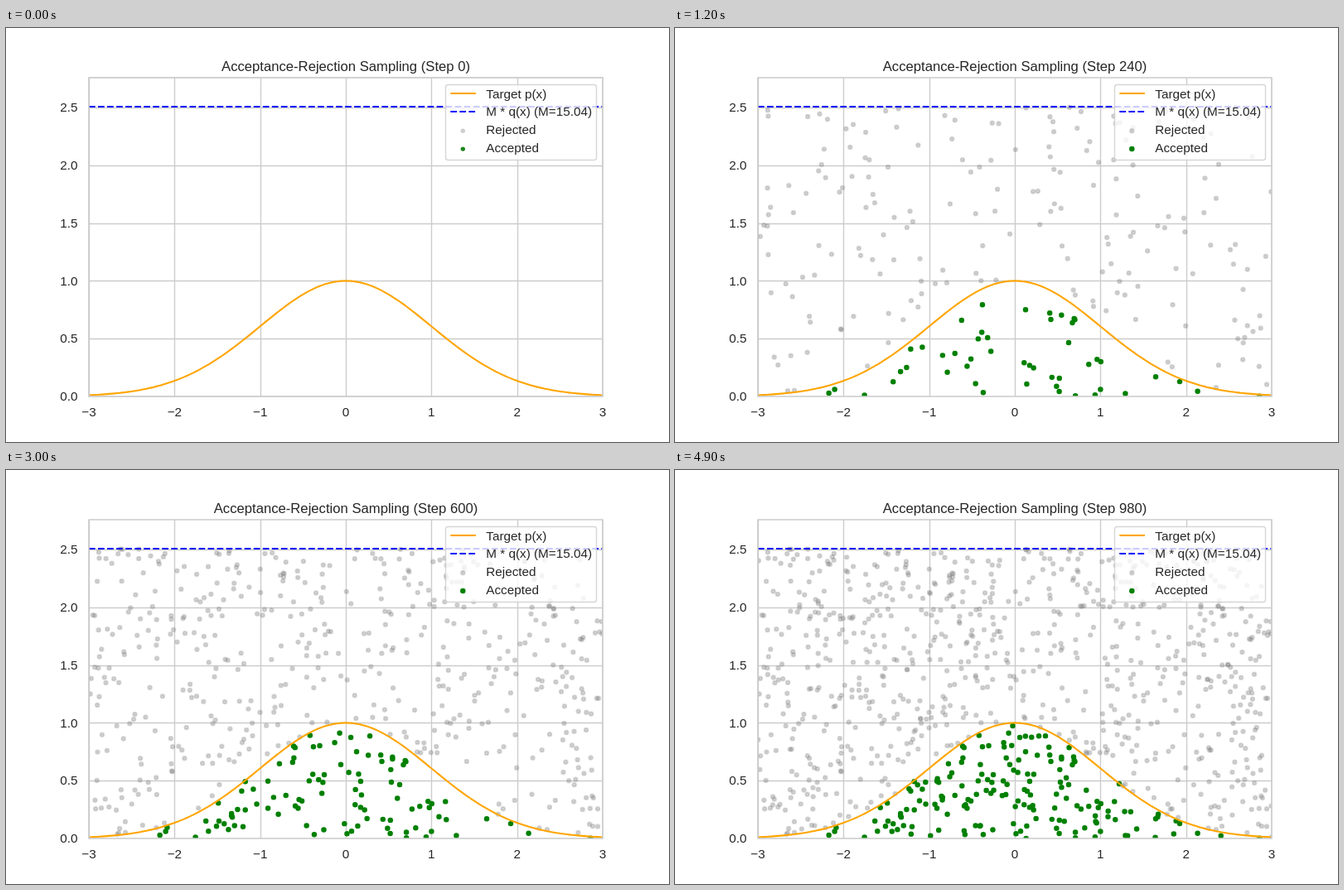
Animation of 800 by 500 pixels, one loop 5000 ms. Source, as an HTML page with a canvas:

```html
<!DOCTYPE html>
<html lang="en">
<head>
<meta charset="utf-8">
<title>Acceptance-Rejection Sampling</title>
<style>
html, body { margin: 0; width: 100%; height: 100%; overflow: hidden; background: #fff; }
canvas { display: block; }
</style>
</head>
<body>
<canvas id="plot" width="800" height="500"></canvas>
<script>
const ctx = document.getElementById("plot").getContext("2d");
const PT = 100 / 72, COUNT = 1000, PER_STEP = 20, STEP_MS = 100, STEPS = 50;
const L = 100, R = 720, T = 60, B = 445;
const TOP = Math.sqrt(2 * Math.PI);
const px = x => L + (x + 3) / 6 * (R - L);
const py = y => B - y / (TOP * 1.1) * (B - T);
const bell = x => Math.exp(-x * x / 2);

// Mersenne Twister giving 53-bit floats in [0, 1)
function twister(seed) {
  const s = new Uint32Array(624);
  let pos = 624;
  s[0] = seed;
  for (let i = 1; i < 624; i++) s[i] = Math.imul(1812433253, s[i - 1] ^ (s[i - 1] >>> 30)) + i;
  function next() {
    if (pos === 624) {
      for (let i = 0; i < 624; i++) {
        const y = (s[i] & 0x80000000) | (s[(i + 1) % 624] & 0x7fffffff);
        s[i] = s[(i + 397) % 624] ^ (y >>> 1) ^ (y & 1 ? 0x9908b0df : 0);
      }
      pos = 0;
    }
    let y = s[pos++];
    y ^= y >>> 11;
    y ^= (y << 7) & 0x9d2c5680;
    y ^= (y << 15) & 0xefc60000;
    return (y ^ (y >>> 18)) >>> 0;
  }
  return () => ((next() >>> 5) * 67108864 + (next() >>> 6)) / 9007199254740992;
}

const rand = twister(0);
const points = Array.from({ length: COUNT }, () => ({ x: rand() * 6 - 3 }));
for (const p of points) {
  p.y = rand() * TOP;
  p.ok = p.y <= bell(p.x);
}

function line(coords, color, width, dash = []) {
  ctx.beginPath();
  for (const [x, y] of coords) ctx.lineTo(x, y);
  ctx.strokeStyle = color;
  ctx.lineWidth = width * PT;
  ctx.lineJoin = "round";
  ctx.setLineDash(dash.map(d => d * width * PT));
  ctx.stroke();
  ctx.setLineDash([]);
}

function dot(x, y, color) {
  ctx.beginPath();
  ctx.arc(x, y, Math.sqrt(10) / 2 * PT, 0, 2 * Math.PI);
  ctx.fillStyle = ctx.strokeStyle = color;
  ctx.lineWidth = 1.5 * PT;
  ctx.fill();
  ctx.stroke();
}

function plainDot(x, y, color) {
  ctx.beginPath();
  ctx.arc(x, y, 2.7, 0, 2 * Math.PI);
  ctx.fillStyle = color;
  ctx.fill();
}

function text(str, x, y, align, size = 11) {
  ctx.font = `${size * PT}px "Liberation Sans", Arial, sans-serif`;
  ctx.textAlign = align;
  ctx.fillStyle = "#262626";
  ctx.fillText(str, x, y);
}

const GRID = "#ccc", GRAY = "rgba(128,128,128,0.3)", GREEN = "#008000";
const DASH = [3.7, 1.6];
const snap = v => Math.floor(v + 0.5) + 0.5;
const curve = Array.from({ length: 201 }, (_, i) => {
  const x = -3 + i * 0.03;
  return [px(x), py(bell(x))];
});

function legend(empty) {
  ctx.globalAlpha = 0.8;
  ctx.beginPath();
  ctx.roundRect(530.5, 68.5, 182, 91, 3.06);
  ctx.fillStyle = "#fff";
  ctx.fill();
  ctx.strokeStyle = GRID;
  ctx.lineWidth = PT;
  ctx.stroke();
  ctx.globalAlpha = 1;
  line([[536.3, 79], [566.9, 79]], "orange", 1.5);
  line([[536.3, 101], [566.9, 101]], "blue", 1.5, DASH);
  if (empty) {
    plainDot(551.3, 124.3, "#cfcfcf");
    plainDot(551.3, 146.1, "#1e861e");
  } else {
    dot(551.3, 124.3, GRAY);
    dot(551.3, 146.1, GREEN);
  }
  ["Target p(x)", `M * q(x) (M=${(TOP * 6).toFixed(2)})`, "Rejected", "Accepted"]
    .forEach((label, i) => text(label, 579.3, [85, 106, 128, 150][i], "left"));
}

function draw(step) {
  ctx.fillStyle = "#fff";
  ctx.fillRect(0, 0, 800, 500);

  ctx.save();
  ctx.beginPath();
  ctx.rect(L, T, R - L, B - T);
  ctx.clip();
  for (let x = -3; x <= 3; x++) line([[snap(px(x)), T], [snap(px(x)), B]], GRID, 1);
  for (let y = 0; y <= 2.5; y += 0.5) line([[L, snap(py(y))], [R, snap(py(y))]], GRID, 1);
  const shown = points.slice(0, step);
  for (const p of shown) if (!p.ok) dot(px(p.x), py(p.y), GRAY);
  for (const p of shown) if (p.ok) dot(px(p.x), py(p.y), GREEN);
  line(curve, "orange", 1.5);
  line([[L, py(TOP)], [R, py(TOP)]], "blue", 1.5, DASH);
  ctx.restore();

  ctx.strokeStyle = GRID;
  ctx.lineWidth = 1.25 * PT;
  ctx.strokeRect(L, T, R - L, B - T);

  for (let x = -3; x <= 3; x++) text(String(x).replace("-", "\u2212"), px(x), 469, "center");
  for (let y = 0; y <= 2.5; y += 0.5) text(y.toFixed(1), 86.4, Math.round(py(y) + 5.2), "right");
  text(`Acceptance-Rejection Sampling (Step ${step})`, 410, 52, "center", 12);
  legend(step === 0);
}

let last = -1;
function tick() {
  const step = Math.floor(performance.now() / STEP_MS) % STEPS * PER_STEP;
  if (step !== last) draw(last = step);
  requestAnimationFrame(tick);
}
tick();
</script>
</body>
</html>
```
